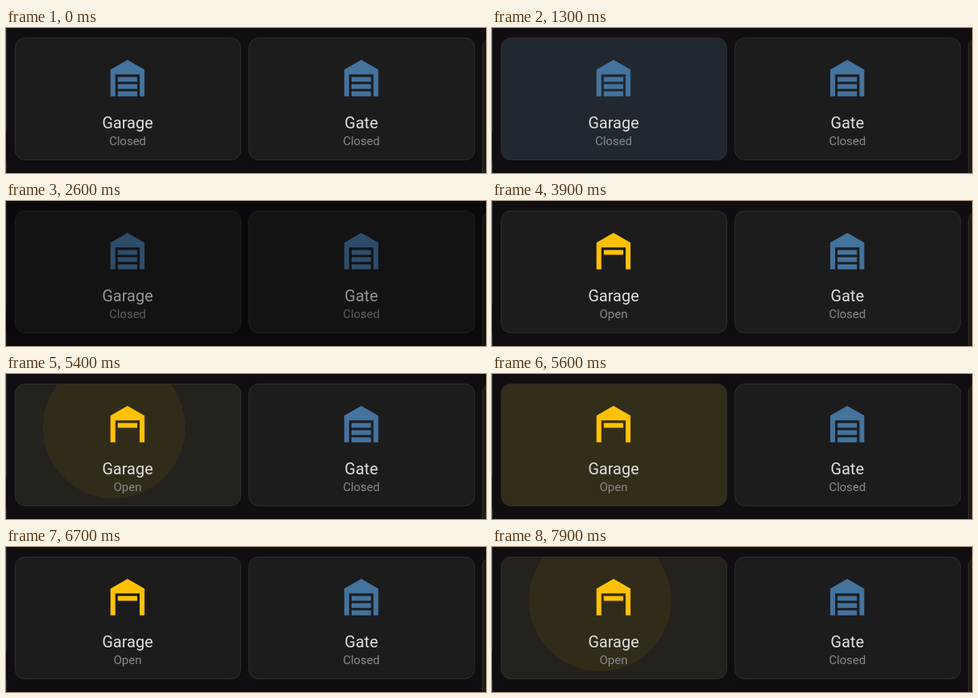
Write an HTML page that moves like this. It is 600 px wide and 182 px high and loops after 8 s.

```html
<!DOCTYPE html>
<html lang="en">
<head>
<meta charset="utf-8">
<title>Garage and gate</title>
<style>
html, body { margin: 0; width: 100%; height: 100%; overflow: hidden; background: #100e11; }
svg { display: block; width: 600px; height: 182px; }
text { font-family: Roboto, Arial, sans-serif; text-anchor: middle; }
.card { fill: #1c1c1d; }
.edge { fill: none; stroke: #2d2d2f; }
.name { font-size: 20px; fill: #dfdfdf; }
.state { font-size: 15px; fill: #888; }
.icon { fill: #44739e; }
</style>
</head>
<body>
<svg viewBox="0 0 600 182">
  <defs>
    <clipPath id="inside"><rect x="11.5" y="12.5" width="282" height="153" rx="12"/></clipPath>
    <path id="frame" d="M5 20V9L12 5L19 9V20H17V11H7V20ZM8 12H16V14H8Z"/>
    <path id="slats" d="M8 15H16V17H8ZM8 18H16V20H8Z"/>
  </defs>

  <g class="card" stroke="#2d2d2f">
    <rect x="-60" y="-20" width="60.5" height="159" rx="12"/>
    <rect x="-60" y="158" width="60.5" height="60" rx="12"/>
    <rect x="595.5" y="12.5" width="60" height="200" rx="12" fill="#1b1b18"/>
  </g>

  <g>
    <rect class="card" x="11.5" y="12.5" width="282" height="153" rx="12"/>
    <g id="tint" clip-path="url(#inside)">
      <rect id="hover" x="11" y="12" width="283" height="154"/>
      <circle id="ripple"/>
    </g>
    <rect class="edge" x="11.5" y="12.5" width="282" height="153" rx="12"/>
    <g id="door" class="icon" transform="translate(115.4 24.9) scale(3.04)">
      <use href="#frame"/><use id="doorSlats" href="#slats"/>
    </g>
    <text class="name" x="152" y="126">Garage</text>
    <text id="doorState" class="state" x="152" y="147">Closed</text>
  </g>

  <g transform="translate(292.2 0)">
    <rect class="card" x="11.5" y="12.5" width="282" height="153" rx="12"/>
    <rect class="edge" x="11.5" y="12.5" width="282" height="153" rx="12"/>
    <g class="icon" transform="translate(115.4 24.9) scale(3.04)">
      <use href="#frame"/><use href="#slats"/>
    </g>
    <text class="name" x="152" y="126">Gate</text>
    <text class="state" x="152" y="147">Closed</text>
  </g>

  <rect id="scrim" width="600" height="182" opacity="0"/>
</svg>
<script>
const LOOP = 8000, STEP = 100;
const OPENED = 3900, PRESSES = [1100, 5400, 7900];
const $ = id => document.getElementById(id);
const set = (el, attrs) => {
  for (const key in attrs) el.setAttribute(key, attrs[key]);
};
const mix = (a, b, k) => a + (b - a) * k;

function draw(t) {
  const open = t >= OPENED;
  const color = open ? '#ffc107' : '#44739e';
  $('door').style.fill = color;
  $('doorSlats').style.display = open ? 'none' : '';
  $('doorState').textContent = open ? 'Open' : 'Closed';

  // A press grows from the pointer toward the card's centre, then fades.
  const start = PRESSES.find(p => t >= p && t < p + 400);
  const age = t - start;
  const grow = Math.min(1, age / 200);
  const fade = Math.min(1, (400 - age) / 200);
  set($('tint'), { fill: color, opacity: start === undefined ? 0 : fade });
  if (start !== undefined) {
    set($('hover'), { opacity: 0.035 });
    set($('ripple'), {
      cx: mix(135, 152, grow), cy: mix(67, 89, grow), r: mix(89, 172, grow),
      opacity: mix(0.06, open ? 0.07 : 0.1, grow)
    });
  }

  set($('scrim'), { opacity: t >= 2600 && t < 2700 ? 0.33 : 0 });
}

function tick(now) {
  draw(Math.floor(now % LOOP / STEP) * STEP);
  requestAnimationFrame(tick);
}
draw(0);
requestAnimationFrame(tick);
</script>
</body>
</html>
```
